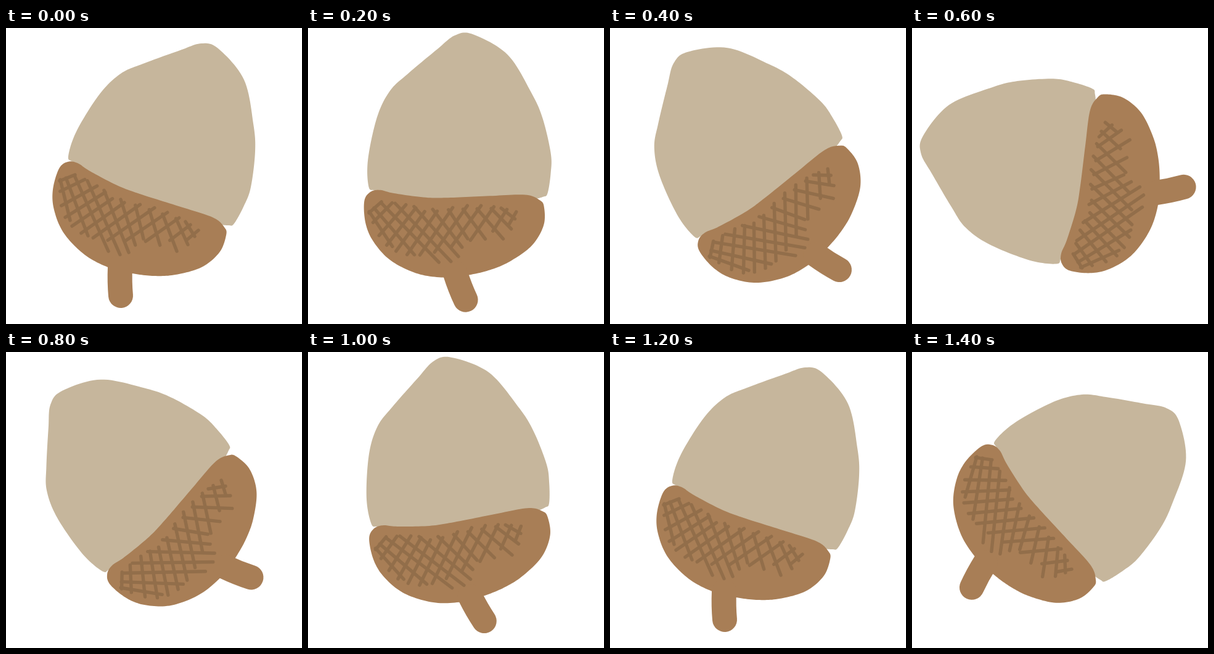
These frames come from a looping animation (480x480 px, 1.6 s). An HTML page with a canvas:

```html
<!DOCTYPE html>
<html lang="en">
<head>
<meta charset="utf-8">
<title>Rocking acorn</title>
<style>
  html, body { margin: 0; width: 100%; height: 100%; overflow: hidden; background: #fff; }
  canvas { display: block; width: 100vw; height: 100vh; }
</style>
</head>
<body>
<canvas id="stage" width="480" height="480"></canvas>
<script>
const ctx = document.getElementById('stage').getContext('2d');
const SIZE = 480, STEP = 200;
const NUT = '#c6b69c', CAP = '#a87e56', HATCH = '#926e4a';

// Tilt in degrees for each held pose
const TILTS = [0, -20, -56.5, -100.5, -67, -28.7, 0, 29.7];

const points = text => text.split(' ').map(p => p.split(',').map(Number));

// Catmull-Rom position between b and c
const blend = (a, b, c, d, t) => b + t / 2 *
  (c - a + t * (2 * a - 5 * b + 4 * c - d + t * (3 * (b - c) + d - a)));

// Point at u (0..1) on a spline, closed or with clamped ends
function along(pts, u, closed) {
  const n = pts.length, spans = closed ? n : n - 1;
  const i = Math.min(Math.floor(u * spans), spans - 1);
  const at = k => pts[closed ? (k + n) % n : Math.max(0, Math.min(n - 1, k))];
  const [a, b, c, d] = [-1, 0, 1, 2].map(k => at(i + k));
  return [0, 1].map(axis => blend(a[axis], b[axis], c[axis], d[axis], u * spans - i));
}

function outline(text) {
  const pts = points(text), path = new Path2D(), count = pts.length * 12;
  for (let i = 0; i < count; i++) path.lineTo(...along(pts, i / count, true));
  path.closePath();
  return path;
}

// Evenly spread strokes running from one rail to another
function hatch(count, from, to) {
  const path = new Path2D(), a = points(from), b = points(to);
  for (let i = 0; i < count; i++) {
    const u = i / (count - 1);
    path.moveTo(...along(a, u));
    path.lineTo(...along(b, u));
  }
  return path;
}

const nut = outline('101,208 115,166 152,107 186,74 222,58 280,37 317,25 345,34 386,84 ' +
  '401,155 404,200 397,258 386,288 370,317 361,320 342,317 320,303 210,275 130,240 109,218');

const cap = outline('86,228 100,217 116,219 136,232 182,256 220,270 280,289 335,307 354,323 ' +
  '357,336 346,364 317,388 275,400 240,402 205,398 168,389 128,368 94,333 78,295 76,262');

const stem = new Path2D('M185 388 Q184 412 186 434');

const rising = hatch(12,
  '87,248 94,303 131,337 200,346 294,343',
  '112,238 151,258 179,280 232,289 277,306 312,328');

const falling = hatch(11,
  '88,246 121,243 186,278 243,298 291,314',
  '104,312 166,362 199,364 223,342 277,362 306,338');

function stroke(path, color, width) {
  ctx.strokeStyle = color;
  ctx.lineWidth = width;
  ctx.stroke(path);
}

function draw(tilt) {
  ctx.fillStyle = '#fff';
  ctx.fillRect(0, 0, SIZE, SIZE);
  ctx.save();
  ctx.translate(SIZE / 2, SIZE / 2);
  ctx.rotate(tilt * Math.PI / 180);
  ctx.translate(-SIZE / 2, -SIZE / 2);
  ctx.lineCap = 'round';
  ctx.fillStyle = NUT;
  ctx.fill(nut);
  ctx.fillStyle = CAP;
  ctx.fill(cap);
  stroke(stem, CAP, 40);
  stroke(rising, HATCH, 5.4);
  stroke(falling, HATCH, 5.4);
  ctx.restore();
}

const start = performance.now();
function tick() {
  const elapsed = performance.now() - start;
  draw(TILTS[Math.floor(elapsed / STEP) % TILTS.length]);
  requestAnimationFrame(tick);
}
tick();
</script>
</body>
</html>
```
